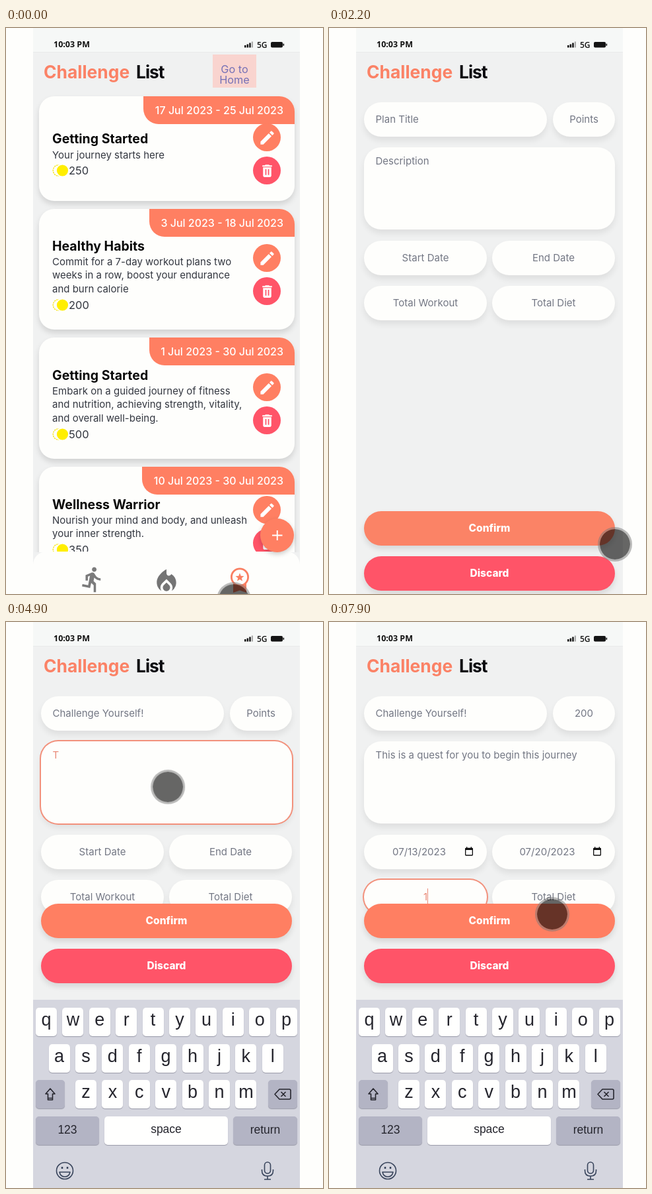
An HTML page for the animation above (8 s loop, 480x854 px).

```html
<!DOCTYPE html>
<html lang="en">
<head>
<meta charset="utf-8">
<title>Challenge list</title>
<style>
:root { --orange: #ff7f62; --pink: #ff5468; --paper: #fefefc; --bg: #f0f1f1; }
html, body { margin: 0; width: 100%; height: 100%; overflow: hidden; background: var(--paper); }
body { position: relative; font: 15px Inter, sans-serif; color: #333740; }
div, svg { position: absolute; box-sizing: border-box; }
svg { overflow: visible; }
.t { line-height: 0; white-space: nowrap; }
.mid { transform: translateX(-50%); }
#phone { left: 41px; top: 0; width: 404px; height: 854px; background: var(--bg); }
#status { left: 41px; top: 0; width: 404px; height: 37px; background: #f6f8f7; border-bottom: 1px solid #e9ebeb; }
.clock { font: 700 12.5px/0 "Open Sans", sans-serif; color: #111; }
.net { font: 600 12px/0 "Open Sans", sans-serif; color: #111; }
.head { font-size: 26.4px; font-weight: 700; }

#list, #form { inset: 0; }
#list { animation: leave 8s step-end infinite; }
#form { animation: enter 8s step-end infinite; }
@keyframes leave { 0% { visibility: visible } 26.25%, 100% { visibility: hidden } }
@keyframes enter { 0% { visibility: hidden } 26.25%, 100% { visibility: visible } }

#home { left: 313px; width: 66px; text-align: center; line-height: 16px; animation: dress 8s infinite; }
@keyframes dress {
  0% { top: 40px; height: 50px; padding-top: 14.5px; font-size: 16.3px; color: #7671b6; background: #f9d4cf; border-radius: 0 }
  3.75%, 100% { top: 37px; height: 58px; padding-top: 13px; font-size: 12.8px; color: #fff; background: #ff7f62; border-radius: 0 0 21px 21px }
}

#cards { left: 0; top: 0; width: 480px; height: 791px; overflow: hidden; }
.card { left: 50px; width: 387px; border-radius: 23px; background: var(--paper); box-shadow: 0 5px 9px rgba(0,0,0,.13); }
.tag { top: 0; right: 0; height: 41.5px; border-radius: 0 23px 0 23px; background: var(--orange); }
.date { right: 17px; top: 21px; font-size: 16px; font-weight: 500; color: #fff; }
.name { left: 20px; font-size: 19.5px; font-weight: 700; color: #080808; }
.text { left: 20px; }
.coins { left: 45px; font-size: 16.5px; }
.dot { width: 42px; height: 42px; border-radius: 50%; left: 324px; }
.nav { left: 41px; top: 790px; width: 404px; height: 64px; border-radius: 20px 20px 0 0; background: var(--paper); }
#add { left: 385px; top: 740px; width: 51px; height: 51px; border-radius: 50%; background: var(--orange); box-shadow: 0 3px 7px rgba(0,0,0,.2); }

.field { border-radius: 26px; background: var(--paper); box-shadow: 0 6px 10px rgba(0,0,0,.075); color: #737784; }
.field.on { box-shadow: 0 0 0 2px #f2917c, 0 6px 10px rgba(0,0,0,.075); }
.field.edit { color: #e98a78; }
.field svg { display: none; }
.field.dated svg { display: block; }
.caret { border-right: 1px solid #e98a78; margin-right: -1px; padding: 3px 0; }
.empty { padding: 0 1.5px; font-size: 15.5px; }
.pick { background: #3c8dcb; color: #fff; padding-top: 1px; padding-bottom: 1px; }

#dock { left: 0; top: 424.5px; width: 480px; height: 429.5px; animation: dock 8s infinite linear; }
@keyframes dock {
  0%, 35% { transform: translateY(304px); animation-timing-function: ease-out }
  39%, 82.5% { transform: none }
  85% { transform: translateY(265.5px) }
  86.25%, 95% { transform: translateY(304px); animation-timing-function: ease-out }
  98%, 100% { transform: none }
}
.btn { left: 53px; width: 380px; height: 52px; border-radius: 26px; box-shadow: 0 5px 9px rgba(0,0,0,.11);
  text-align: center; font-size: 15.5px; font-weight: 800; line-height: 52px; color: #fff; }
#ok { top: 0; background: var(--orange); animation: hover 8s step-end infinite; }
@keyframes hover { 26.25% { background: #fb8366 } 30%, 100% { background: #ff7f62 } }
#keys { left: 41px; top: 145.5px; width: 404px; height: 304px; background: #d5d6df;
  font-family: "Liberation Sans", Arial, sans-serif; color: #25252d; }
.key { height: 43px; border-radius: 5px; background: #fffffe; box-shadow: 0 1px 1px #9a9ba8; text-align: center; font-size: 27px; line-height: 36px; }
.word { font-size: 17.5px; line-height: 38px; }
.dim { background: #b3b4c4; line-height: 41px; }

#touch { left: -26px; top: -26px; width: 52px; height: 52px; border-radius: 50%; background: rgba(0,0,0,.6) padding-box;
  border: 3px solid rgba(120,120,120,.5); animation: touch 8s infinite linear; }
@keyframes touch {
  0% { transform: translate(345px, 862px) }
  3% { transform: translate(345px, 895px) }
  3.1%, 21% { transform: translate(520px, 800px) }
  22.5% { transform: translate(490px, 796px) }
  23.75% { transform: translate(460px, 790px) }
  25% { transform: translate(431px, 777px) }
  27.5% { transform: translate(433px, 779px); animation-timing-function: ease-in-out }
  34%, 37% { transform: translate(190px, 150px) }
  43% { transform: translate(215px, 190px) }
  48.75% { transform: translate(281px, 358px) }
  54% { transform: translate(272px, 310px) }
  58.5%, 61% { transform: translate(245px, 248px) }
  73.75% { transform: translate(252px, 288px) }
  76.5% { transform: translate(258px, 272px); animation-timing-function: ease-in-out }
  78.75%, 81.25% { transform: translate(384px, 143px) }
  83.5% { transform: translate(152px, 352px) }
  85% { transform: translate(161px, 371px) }
  88% { transform: translate(165px, 374px) }
  90.5% { transform: translate(340px, 352px) }
  93% { transform: translate(442px, 380px) }
  94.75%, 96.5% { transform: translate(152px, 408px) }
  98.75%, 100% { transform: translate(338px, 441px) }
}
</style>
</head>
<body>
<div id="phone"></div>
<div id="list">
  <div id="cards"></div>
  <div class="nav"></div>
  <div id="icons"></div>
  <div id="home">Go to<br>Home</div>
  <div id="add"><svg width="51" height="51" stroke="#fff" stroke-width="1.9"><path d="M18 25.500H33.500M25.750 18V33"/></svg></div>
</div>
<div id="form">
  <div id="fields"></div>
  <div id="dock">
    <div class="btn" id="ok">Confirm</div>
    <div class="btn" style="top:68px;background:var(--pink)">Discard</div>
    <div id="keys"></div>
  </div>
</div>
<div id="status"></div>
<div class="t clock" style="left:72px;top:25px">10:03 PM</div>
<div class="t net" style="left:380px;top:26px">5G</div>
<svg width="480" height="40" fill="#151515">
  <path d="M361 26h2.5v3.5h-2.5zM364.6 24.5h2.5v5h-2.5zM368.2 22.5h2.5v7h-2.5z"/>
  <path d="M371.8 20.5h2.2v9h-2.2z" fill="#aaa"/>
  <rect x="401" y="21" width="18" height="8.5" rx="2"/><rect x="419.5" y="23.5" width="1.6" height="3.5" rx=".8"/>
</svg>
<div class="t head" style="left:57px;top:66px;color:#fb8266">Challenge</div>
<div class="t head" style="left:197px;top:66px;color:#0b0b10;letter-spacing:-1px">List</div>
<div id="touch"></div>

<script>
const $ = id => document.getElementById(id);
const box = (x, y, w, h) => `left:${x}px;top:${y}px;width:${w}px;height:${h}px`;
const line = (cls, y, s) => `<div class="t ${cls}" style="top:${y}px">${s}</div>`;
const icon = (x, y, size, d, fill) =>
  `<svg style="left:${x}px;top:${y}px" width="${size}" height="${size}" viewBox="0 0 24 24" fill="${fill}"><path d="${d}"/></svg>`;

const PEN = "M3 17.25V21h3.75L17.81 9.94l-3.75-3.75L3 17.25zM20.71 7.04a1 1 0 0 0 0-1.41l-2.34-2.34a1 1 0 0 0-1.41 0l-1.83 1.83 3.75 3.75z";
const BIN = "M6 19c0 1.1.9 2 2 2h8c1.1 0 2-.9 2-2V7H6zM19 4h-3.5l-1-1h-5l-1 1H5v2h14zM9.2 9.5h1.7v8.5H9.2zM13.1 9.5h1.7v8.5h-1.7z";
const RUN = "M13.49 5.48c1.1 0 2-.9 2-2s-.9-2-2-2-2 .9-2 2 .9 2 2 2zm-3.6 13.9l1-4.4 2.1 2v6h2v-7.5l-2.1-2 .6-3c1.3 1.5 3.3 2.5 5.5 2.5v-2c-1.9 0-3.5-1-4.3-2.4l-1-1.6c-.4-.6-1-1-1.7-1-.3 0-.5.1-.8.1l-5.2 2.2v4.7h2v-3.4l1.8-.7-1.6 8.1-4.9-1-.4 2 7 1.4z";
const FIRE = "M12 12.9l-2.13 2.09c-.56.56-.87 1.29-.87 2.07C9 18.68 10.35 20 12 20s3-1.32 3-2.94c0-.78-.31-1.52-.87-2.07zM16 6l-.44.55C14.38 8.02 12 7.19 12 5.3V2S4 6 4 13c0 2.92 1.56 5.47 3.89 6.86-.56-.79-.89-1.76-.89-2.8 0-1.32.52-2.56 1.47-3.5L12 10.1l3.53 3.47c.95.93 1.47 2.17 1.47 3.5 0 1.02-.31 1.96-.85 2.75 1.89-1.15 3.29-3.06 3.71-5.3.66-3.55-1.07-6.9-3.86-8.52z";

// Challenge cards
const coin = y => `<svg style="left:20px;top:${y - 10}px" width="24" height="20">
  <circle cx="9.5" cy="10" r="8.2" fill="none" stroke="#f7e620" stroke-width="1.4" stroke-dasharray="2.5 1"/>
  <circle cx="15" cy="10" r="10" fill="#fefefc"/><circle cx="15.5" cy="10" r="8.6" fill="#fe0"/></svg>`;
const dot = (y, color, d, size) => `<div class="dot" style="top:${y - 21}px;background:${color}">
  ${icon(21 - size / 2, 21 - size / 2, size, d, "#fff")}</div>`;
const card = ({ y, h, tag, date, name, nameY, text, coins, tools }) => {
  const rows = text.map((s, i) => line("text", nameY + 24.5 + i * 20.4, s)).join("");
  const coinY = nameY + 48 + (text.length - 1) * 20.6;
  return `<div class="card" style="top:${y}px;height:${h}px">
    <div class="tag" style="width:${tag}px"></div>${line("date", 21, date)}
    ${line("name", nameY, name)}${rows}${coin(coinY)}${line("coins", coinY, coins)}
    ${dot(tools, "var(--orange)", PEN, 27)}${dot(tools + 50, "var(--pink)", BIN, 25)}</div>`;
};
$("cards").innerHTML = [
  { y: 103, h: 158, tag: 229, date: "17 Jul 2023 - 25 Jul 2023", name: "Getting Started", nameY: 64,
    text: ["Your journey starts here"], coins: 250, tools: 62 },
  { y: 273, h: 182, tag: 220, date: "3 Jul 2023 - 18 Jul 2023", name: "Healthy Habits", nameY: 55.5,
    text: ["Commit for a 7-day workout plans two", "weeks in a row, boost your endurance", "and burn calorie"], coins: 200, tools: 74 },
  { y: 467, h: 183, tag: 220, date: "1 Jul 2023 - 30 Jul 2023", name: "Getting Started", nameY: 56.5,
    text: ["Embark on a guided journey of fitness", "and nutrition, achieving strength, vitality,", "and overall well-being."], coins: 500, tools: 75 },
  { y: 662, h: 163, tag: 231, date: "10 Jul 2023 - 30 Jul 2023", name: "Wellness Warrior", nameY: 56.5,
    text: ["Nourish your mind and body, and unleash", "your inner strength."], coins: 350, tools: 65 }
].map(card).join("");

const star = Array.from({ length: 10 }, (_, i) => {
  const r = i % 2 ? 2.9 : 6.8, a = (i / 5 - .5) * Math.PI;
  return `${354 + r * Math.cos(a)},${829 + r * Math.sin(a)}`;
}).join(" ");
$("icons").innerHTML = icon(110, 811, 42, RUN, "#7b7b7b") + icon(221, 813, 44, FIRE, "#747474") +
  `<svg width="480" height="854"><path d="M344 838v14l10-3.5 10 3.5v-14z" fill="#f97f62"/>
  <circle cx="354" cy="828.5" r="12.6" fill="#fefefc" stroke="#f97f62" stroke-width="2.8"/><polygon points="${star}" fill="#f97f62"/></svg>`;

// Keyboard
const key = (x, y, w, s, cls = "") => `<div class="key ${cls}" style="left:${x}px;top:${y}px;width:${w}px">${s}</div>`;
const row = (s, x, y) => [...s].map((c, i) => key(x + i * 40.4, y, 32, c)).join("");
$("keys").innerHTML = row("qwertyuiop", 4, 12) + row("asdfghjkl", 23.5, 67) + row("zxcvbnm", 64, 121) +
  key(4, 121, 44, "", "dim") + key(356, 121, 44, "", "dim") + key(4, 176, 96, "123", "word dim") +
  key(108, 176, 187, "space", "word") + key(303, 176, 97, "return", "word dim") +
  `<svg width="404" height="304" fill="none" stroke="#25252d" stroke-width="1.6" stroke-linejoin="round">
    <path d="M26 134l7 8h-3.500v9h-7v-9H19zM22.500 148.500h7"/>
    <path d="M373 135h15q2 0 2 2v11q0 2-2 2h-15l-7-7.500zM375.500 139l7 7M382.500 139l-7 7"/>
    <g stroke="#39455c"><circle cx="48" cy="258" r="12.500"/><path d="M40 260h16q-1.500 7-8 7t-8-7z"/>
    <path d="M44 252v3M52 252v3" stroke-width="2.500"/>
    <rect x="350.500" y="245" width="9" height="17" rx="4.500"/><path d="M346.500 256v2q0 8 8.500 8t8.500-8v-2M355 266v5M350 271h10"/></g></svg>`;

// Form: focus is a time span, keys are [time, characters typed]
const CAL = "M19 4h-1V2h-2v2H8V2H6v2H5a2 2 0 0 0-2 2v14a2 2 0 0 0 2 2h14a2 2 0 0 0 2-2V6a2 2 0 0 0-2-2zm0 16H5V9h14z";
const fields = [
  { x: 53, y: 112, w: 277, label: "Plan Title", left: true, focus: [2800, 4700],
    value: "Challenge Yourself!", keys: [[3600, 0], [3900, 6], [4600, 19]] },
  { x: 339, y: 112, w: 94, label: "Points", focus: [6300, 6620], value: "200", keys: [[6380, 0], [6550, 3]] },
  { x: 53, y: 180, w: 380, h: 124, label: "Description", left: true, textY: 21, focus: [4700, 6300],
    value: "This is a quest for you to begin this journey", keys: [[4850, 0], [5900, 30], [6220, 45]] },
  { x: 53, y: 321, w: 186, label: "Start Date", focus: [6650, 7250], date: ["07", "13", "2023"], steps: [6950, 7080, 7200] },
  { x: 247, y: 321, w: 186, label: "End Date", focus: [7250, 7560], hover: [3750, 4250], date: ["07", "20", "2023"], steps: [7340, 7420, 7500] },
  { x: 53, y: 389, w: 186, label: "Total Workout", focus: [7580, 8000], value: "1", keys: [[7750, 0], [7850, 1]] },
  { x: 247, y: 389, w: 186, label: "Total Diet" }
];
$("fields").innerHTML = fields.map(f => `<div class="field" style="${box(f.x, f.y, f.w, f.h || 52)}">
  <div class="t ${f.left ? "" : "mid"}" style="left:${f.left ? 17.5 : f.w / 2}px;top:${f.textY || 26}px"></div>
  ${f.date ? icon(151, 17, 16, CAL, "#111") : ""}</div>`).join("");
fields.forEach((f, i) => {
  f.el = $("fields").children[i];
  f.out = f.el.firstElementChild;
});

const within = (t, span) => !!span && t >= span[0] && t < span[1];

function typed(t, keys) {
  const i = keys.findIndex(k => k[0] > t);
  if (i === 0) return 0;
  if (i < 0) return keys[keys.length - 1][1];
  const [t0, n0] = keys[i - 1], [t1, n1] = keys[i];
  return Math.round(n0 + (n1 - n0) * (t - t0) / (t1 - t0));
}

function dateText(t, f, focused) {
  const done = f.steps.filter(s => t >= s).length;
  return ["mm", "dd", "yyyy"].map((hint, i) => {
    const cls = (i < done ? "" : "empty") + (focused && i === Math.min(done, 2) ? " pick" : "");
    return `<span class="${cls}">${i < done ? f.date[i] : hint}</span>`;
  }).join("/");
}

function draw(t) {
  for (const f of fields) {
    const focused = within(t, f.focus), dated = !!f.date && t >= f.focus[0];
    let html = f.label;
    if (dated) {
      html = dateText(t, f, focused);
    } else if (f.keys) {
      const n = typed(t, f.keys);
      const caret = focused && Math.floor(t / 400) % 2 ? '<span class="caret"></span>' : "";
      if (n) html = f.value.slice(0, n) + caret;
    }
    f.el.classList.toggle("on", focused || within(t, f.hover));
    f.el.classList.toggle("edit", focused && html !== f.label);
    f.el.classList.toggle("dated", dated);
    if (f.date) f.out.style.left = (dated ? 83.5 : f.w / 2) + "px";
    if (f.last !== html) f.out.innerHTML = f.last = html;
  }
}

let start;
function tick(now) {
  start ??= now;
  draw((now - start) % 8000);
  requestAnimationFrame(tick);
}
draw(0);
requestAnimationFrame(tick);
</script>
</body>
</html>
```
